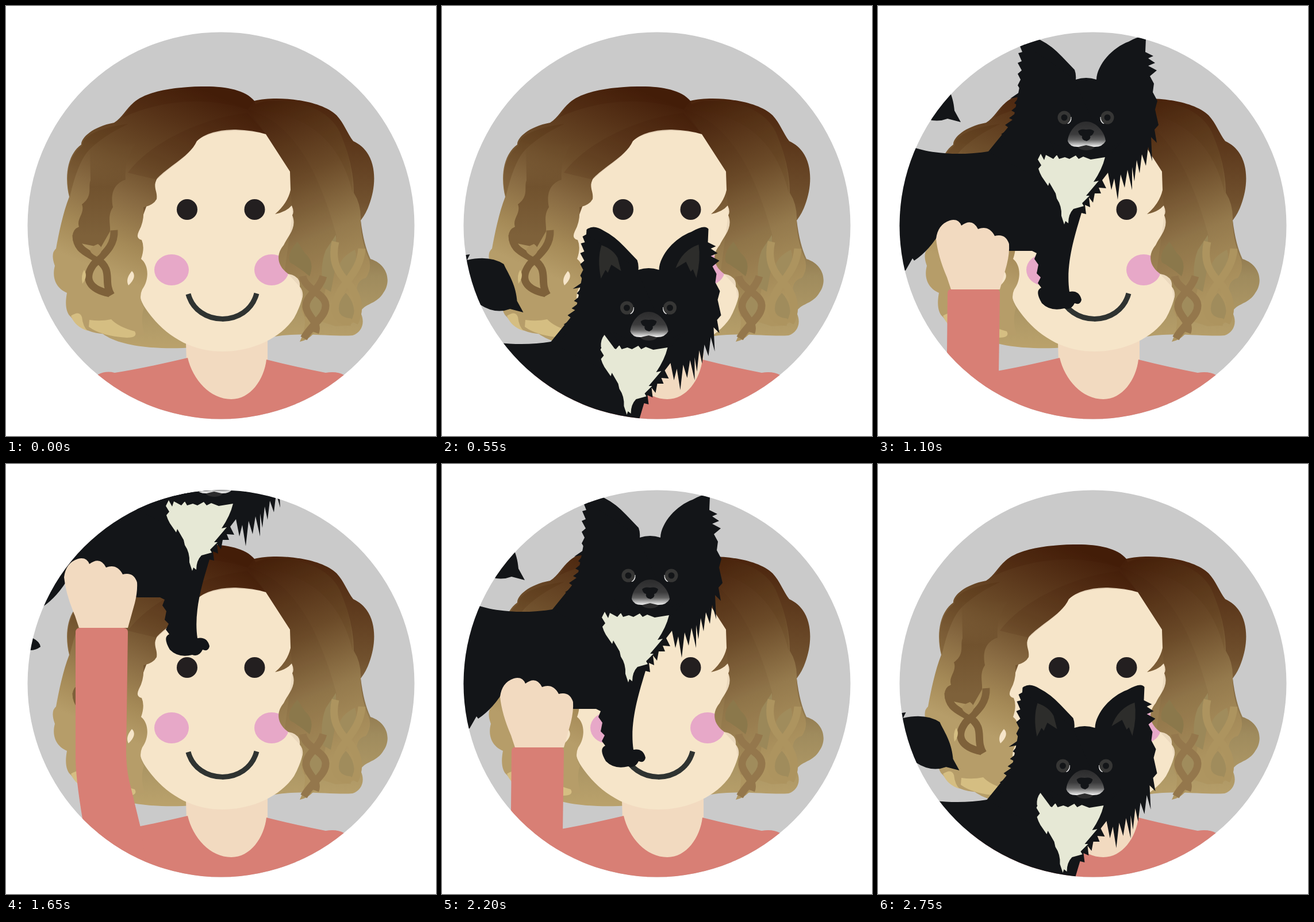
An HTML page for the animation above (3.3 s loop, 748x748 px).

```html
<!DOCTYPE html>
<html lang="en">
<head>
<meta charset="utf-8">
<title>Portrait with dog</title>
<style>
  html, body { margin: 0; width: 100%; height: 100%; overflow: hidden; background: #fff; }
  svg { display: block; width: 100vw; height: 100vh; }
  .skin { fill: #f6e5c9; }
  .hand { fill: #f2dac0; }
  .shirt { fill: #d87f75; }
  .fur { fill: #131518; }
  .lock { fill: none; stroke-width: 13; stroke-linejoin: round; }
</style>
</head>
<body>
<svg viewBox="0 0 748 748">
  <defs>
    <clipPath id="disc"><circle cx="374" cy="382" r="336.5"/></clipPath>
    <linearGradient id="back" gradientUnits="userSpaceOnUse" x1="0" y1="160" x2="0" y2="590">
      <stop stop-color="#4a230c"/><stop offset=".42" stop-color="#71512e"/>
      <stop offset=".72" stop-color="#9f8b5d"/><stop offset="1" stop-color="#b9a16b"/>
    </linearGradient>
    <linearGradient id="left" gradientUnits="userSpaceOnUse" x1="400" y1="170" x2="260" y2="500">
      <stop stop-color="#451f0a"/><stop offset=".2" stop-color="#573318"/>
      <stop offset=".44" stop-color="#6d4d2a"/><stop offset=".62" stop-color="#876941"/>
      <stop offset=".84" stop-color="#a58a57"/><stop offset="1" stop-color="#b69d69"/>
    </linearGradient>
    <linearGradient id="right" gradientUnits="userSpaceOnUse" x1="420" y1="180" x2="560" y2="520">
      <stop stop-color="#451f0a"/><stop offset=".38" stop-color="#6b4a28"/>
      <stop offset=".68" stop-color="#957a4d"/><stop offset="1" stop-color="#ae9560"/>
    </linearGradient>
    <linearGradient id="strand" gradientUnits="userSpaceOnUse" x1="0" y1="230" x2="0" y2="400">
      <stop stop-color="#6d4e2b" stop-opacity="0"/><stop offset=".5" stop-color="#71522e"/>
      <stop offset="1" stop-color="#7e613a"/>
    </linearGradient>
    <linearGradient id="muzzle" x1="0" y1="0" x2="0" y2="1">
      <stop stop-color="#2c2c2d"/><stop offset=".5" stop-color="#3b3b3c"/>
      <stop offset=".72" stop-color="#626262"/><stop offset="1" stop-color="#f4f4f4"/>
    </linearGradient>
  </defs>

  <g clip-path="url(#disc)">
    <rect width="748" height="748" fill="#cacaca"/>

    <!-- back hair -->
    <path fill="url(#back)" d="M432 165C470 156 545 162 575 190C588 204 594 222 604 235C646 254 646 308 632 345Q627 360 617 373Q622 415 634 440C665 450 670 480 657 498C645 519 626 516 616 532C626 550 619 568 603 573C570 576 500 565 455 578L325 594C270 598 200 594 168 570L150 500L300 200Z"/>

    <!-- neck, shirt, face -->
    <path class="hand" d="M313 585L455 570V690H316Z"/>
    <path class="shirt" d="M160 641Q174 634 189 638Q240 630 316 612C325 650 355 684 392 684C425 684 449 650 453 615Q500 627 556 638Q576 635 588 642L600 730H150Z"/>
    <path class="skin" d="M225 400C220 470 230 505 240 522C272 572 320 601 376 601C430 601 478 577 501 543Q512 524 519 495V300L450 200H300Z"/>
    <g fill="#e7a8c8">
      <ellipse cx="288" cy="459" rx="30" ry="27"/><ellipse cx="462" cy="459" rx="30" ry="27"/>
    </g>
    <g fill="#231f20"><circle cx="315" cy="354" r="18"/><circle cx="432.500" cy="354" r="18"/></g>
    <path fill="none" stroke="#2f3331" stroke-width="9" d="M317 501C332 558 420 560 436 500"/>

    <!-- hair, left side -->
    <path fill="url(#left)" d="M432 165C416 145 378 139 340 140C292 141 245 148 222 168C208 180 202 194 188 203C150 210 130 230 131 241C105 260 102 300 110 332C99 360 92 395 87 422Q77 430 85 452C80 470 85 490 106 499C102 520 105 535 113 541Q130 566 165 570L215 574L241 572Q233 545 240 525Q230 508 237 493C250 475 248 450 235 440Q242 420 236 407Q225 405 231 392Q241 375 239 350Q256 347 262 336C264 322 256 318 261 302C280 280 320 262 332 235C350 218 380 215 400 215Q430 216 452 223Z"/>
    <path fill="#3c1603" opacity=".2" d="M432 165C410 142 370 140 340 140C290 141 245 148 222 168L203 194C270 163 350 157 420 180Z"/>
    <path fill="#3c1603" opacity=".12" d="M420 186C340 195 250 238 212 290L262 302C290 275 320 262 332 235C350 218 400 211 452 223Z"/>
    <path fill="#452408" opacity=".2" d="M213 205C175 210 133 222 133 243C108 260 102 300 111 332Q125 270 145 250Q170 225 213 205Z"/>
    <path fill="url(#strand)" d="M146 240L225 240Q205 270 208 302C185 310 182 330 186 350C176 365 182 380 181 392L165 420L140 415L117 410Q112 390 127 384C122 370 138 360 132 345C152 330 142 315 147 303Z"/>
    <path class="lock" stroke="#7e613a" d="M122 398C122 424 140 428 158 440C188 460 168 478 183 503M188 390C190 420 165 435 152 450C134 475 146 493 180 500"/>
    <path fill="#a88d5b" d="M160 414Q174 424 158 436Q134 424 160 414Z"/>
    <path class="skin" d="M219 461Q229 471 213 486Q207 475 219 461Z"/>
    <g fill="#d5be82">
      <path d="M145 546Q165 549 183 545Q195 558 224 566Q230 577 210 577Q165 574 144 558Z"/>
      <path d="M113 539Q128 529 132 541Q134 558 142 565Q120 558 113 539Z"/>
      <path d="M136 459Q143 470 133 483Q130 468 136 459Z"/>
    </g>

    <!-- hair, right side -->
    <path fill="url(#right)" d="M420 180Q440 163 470 165C530 165 572 190 585 230Q605 280 605 325Q618 345 617 373Q618 410 630 437Q638 455 626 473C600 480 614 510 613 530Q612 550 594 556L573 557L545 548Q538 578 511 584Q523 560 519 540C505 520 525 505 511 488Q513 470 491 466C469 450 471 430 483 416C490 400 507 386 498 364Q502 358 497 347Q488 358 468 362Q490 343 495 320L494 288L452 223Z"/>
    <path fill="#4a280d" opacity=".12" d="M420 180Q440 163 470 165C530 165 572 190 585 230Q604 280 603 325Q570 185 422 180Z"/>
    <path fill="#3c1a05" opacity=".06" d="M420 180C490 198 540 270 575 400L560 470L545 548L519 540L511 488L485 460L498 364L494 288L452 223Z"/>
    <path fill="#8b784b" d="M507 410Q488 430 494 446Q510 455 528 470Q538 445 520 430Z"/>
    <path fill="#9b8859" d="M574 398L556 425Q545 455 552 490L565 497L574 450Z"/>
    <path fill="#a08c5c" d="M607 424Q580 438 580 455L593 474Q615 450 607 424ZM591 499Q573 520 580 536Q593 546 606 545Q608 515 591 499ZM535 497Q521 515 530 532L540 546Q561 525 552 508Z"/>
    <path class="lock" stroke="#94774c" d="M516 470C520 493 555 500 556 520C557 540 535 550 518 578M552 470C545 495 520 505 522 524C524 540 545 550 538 568"/>
    <path class="lock" stroke="#ad945f" d="M573 410C565 445 578 465 595 482C615 505 617 530 606 551M619 422C617 460 588 480 579 502C566 530 572 548 600 550"/>

    <!-- dog -->
    <g id="dog">
      <path class="fur" d="M254 58Q266 48 284 60Q302 69 320 88L342 111Q345 119 344 128Q362 122 380 128C381 102 408 72 436 62Q460 48 466 57L465 80L479 87L470 91L482 99L470 104L485 112L473 122L480 135L478 150L486 165L482 180L488 207L481 215L485 238L475 228L477 270L470 245L466 278L459 258L455 291L450 268L446 305L442 280L442 320L434 285L429 316L422 293L417 337L411 300L406 320L400 290L390 303L397 317L384 316L388 326L377 326L374 342L367 333L369 350L360 346L362 362L354 360C342 400 326 450 333 497Q350 494 354 511Q352 521 342 517Q336 530 324 526Q300 532 285 517Q272 495 284 490L278 482L283 472L276 465L279 450L272 440L276 430L268 426H228L110 390Q90 425 63 443L60 439L48 460L0 470V240L65 247C100 258 150 260 192 253L235 200L250 120Z"/>
      <path class="fur" d="M190 253L211 252L207 246L219 241L212 236L226 227L214 223L229 213L221 207L234 198L228 195L240 186L232 182L243 173L237 169L246 158L230 161L249 148L243 138L248 128L243 118L250 112L243 99L250 96L244 82L251 80L247 70L254 66L340 125L400 260L280 300Z"/>
      <path class="fur" d="M44 102L51 101L46 111Q85 102 110 118C117 134 131 152 133 182L144 202L121 196Q95 206 68 188L20 200V120ZM20 490L45 496Q59 503 60 512Q52 518 42 518L20 520Z"/>
      <path fill="#e6e8d5" d="M283 257L289 268L292 259L305 266L311 259L315 266L325 263L333 266L344 260L349 266L357 262L370 267L395 263Q390 284 375 306L384 304L362 330L368 330L355 343L358 348L340 353Q331 362 331 378L326 374L324 380L319 365Q320 348 311 335L309 326L298 307L296 313L285 297Q281 290 279 283L284 277L278 267Z"/>
      <g id="near">
        <path fill="#e6e8d5" d="M285 241L302 264L288 272L279 262Q278 250 285 241Z"/>
        <path fill="#2d2d2b" d="M280 85Q300 92 308 107L314 130L297 119L291 133L287 128L279 143Q272 110 280 85ZM449 84Q420 94 409 125L427 114L435 131L439 127L445 142Q453 110 449 84Z"/>
      </g>
      <path class="fur" d="M300 235Q362 275 425 235L400 262L388 259L378 265L372 257L362 262L340 255L330 261L322 255L310 260Z"/>
      <path fill="#2c2c2d" d="M344 240H380Q376 252 362 251Q348 251 344 240Z"/>
      <path fill="url(#muzzle)" d="M362 201C380 201 395 220 396 235Q390 246 375 245L362 242L349 245Q334 246 330 235C331 220 344 201 362 201Z"/>
      <path class="fur" d="M348 218Q352 213 362 215Q372 213 376 218Q374 225 369 226Q371 232 363 235Q353 233 355 226Q350 225 348 218Z"/>
      <g id="eyes"></g>
    </g>

    <!-- raised arm -->
    <path id="sleeve" class="shirt"/>
    <path id="hand" class="hand" d="M101 405Q104 380 125 373Q140 369 145 382Q164 368 174 388Q193 381 203 400Q222 395 228 414Q229 430 224 450L212 493H127L120 472Q104 435 101 405Z"/>
  </g>
</svg>
<script>
  const $ = id => document.getElementById(id);

  // Dog eye: the white crescent sits on the nose side.
  const eye = (x, side) => `
    <path fill="#eee" d="M${x + 6 * side} 205Q${x + 13 * side} 203 ${x + 12.5 * side} 193L${x} 194Z"/>
    <circle cx="${x}" cy="194" r="11.5" fill="#363635"/><circle cx="${x}" cy="194" r="5.5" fill="#131518"/>`;
  $('eyes').innerHTML = eye(324, 1) + eye(399, -1);

  const cuff = y => `M121 ${y + 8}Q121 ${y} 129 ${y}H204Q212 ${y} 212 ${y + 8}`;
  const poses = {
    away: {},
    low: { dog: [-2.5, 331], near: true },
    mid: { dog: [0, 0], hand: 0, sleeve: cuff(492) + 'L210 640L180 730H110L120 600Z' },
    high: { dog: [0, -194], hand: -208, sleeve: cuff(285) + 'L209 500Q209 535 218 566L234 632L250 730H140L133 617Q121 545 121 510Z' }
  };
  const steps = ['away', 'low', 'mid', 'high', 'mid', 'low'];
  const STEP = 550;

  const show = (id, on) => $(id).setAttribute('display', on ? 'inline' : 'none');
  const move = (id, x, y) => $(id).setAttribute('transform', `translate(${x} ${y})`);

  let current;
  function draw(now) {
    const name = steps[Math.floor(now / STEP) % steps.length];
    if (name === current) return;
    current = name;
    const { dog, near, hand, sleeve } = poses[name];
    show('dog', dog);
    show('near', near);
    show('hand', sleeve);
    show('sleeve', sleeve);
    if (dog) move('dog', ...dog);
    if (sleeve) {
      move('hand', 0, hand);
      $('sleeve').setAttribute('d', sleeve);
    }
  }

  const start = performance.now();
  const tick = () => {
    draw(performance.now() - start);
    requestAnimationFrame(tick);
  };
  tick();
</script>
</body>
</html>
```
